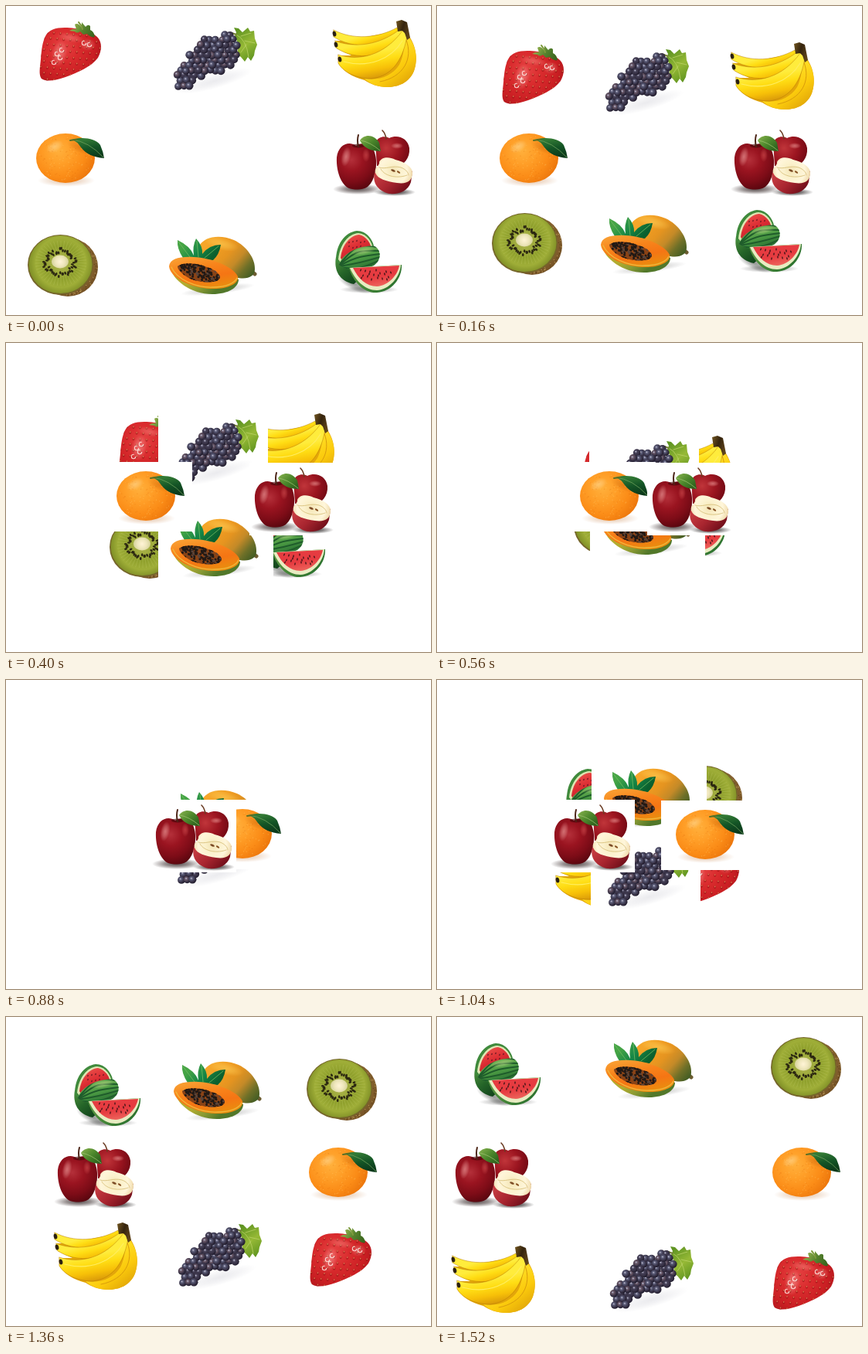
Write an HTML page with a canvas that moves like this. It is 550x400 px and loops after 1600 ms.

```html
<!DOCTYPE html>
<html lang="en">
<head>
<meta charset="utf-8">
<title>Fruit swap</title>
<style>
html, body { margin: 0; width: 100%; height: 100%; overflow: hidden; background: #fff; }
canvas { display: block; }
</style>
</head>
<body>
<canvas id="stage" width="550" height="400"></canvas>
<script>
const ctx = document.getElementById('stage').getContext('2d');
const STEP = 80, STEPS = 20;

// ---- drawing helpers ----
function addStops(g, colors) {
  colors.forEach((c, i) => g.addColorStop(i / (colors.length - 1), c));
  return g;
}
const linear = (x0, y0, x1, y1, ...colors) => addStops(ctx.createLinearGradient(x0, y0, x1, y1), colors);
const radial = (x, y, r, ...colors) => addStops(ctx.createRadialGradient(x, y, 0, x, y, r), colors);

function fill(d, style) {
  ctx.fillStyle = style;
  ctx.fill(new Path2D(d));
}
function line(d, style, width = 1) {
  ctx.strokeStyle = style;
  ctx.lineWidth = width;
  ctx.lineCap = 'round';
  ctx.stroke(new Path2D(d));
}
function oval(x, y, rx, ry, tilt, style) {
  ctx.fillStyle = style;
  ctx.beginPath();
  ctx.ellipse(x, y, rx, ry, tilt, 0, 7);
  ctx.fill();
}
function soft(x, y, rx, ry, rgb, alpha, tilt = 0) {
  ctx.save();
  ctx.translate(x, y);
  ctx.rotate(tilt);
  ctx.scale(rx, ry);
  oval(0, 0, 1, 1, 0, radial(0, 0, 1, `rgba(${rgb},${alpha})`, `rgba(${rgb},${alpha * 0.6})`, `rgba(${rgb},0)`));
  ctx.restore();
}
function inside(d, draw) {
  ctx.save();
  ctx.clip(new Path2D(d));
  draw();
  ctx.restore();
}
function randomizer(seed) {
  return () => (seed = seed * 16807 % 2147483647) / 2147483647;
}

// ---- fruits, drawn at their starting places ----
function strawberry() {
  const body = 'M51 39C55 31 64 28 76 28C93 28 111 33 118 40C125 47 124 58 119 67C110 79 93 86 77 92C65 96 53 99 46 94C42 89 44 80 45 69C46 57 47 47 51 39Z';
  fill(body, radial(74, 52, 60, '#e64444', '#da2c2e', '#ca1f23', '#a8141a'));
  inside(body, () => {
    for (let row = 0; row < 9; row++) {
      for (let col = 0; col < 10; col++) {
        const x = 45 + col * 8.5 + row % 2 * 4.2, y = 33 + row * 7.6 + col * 0.7;
        oval(x, y + 0.8, 1.5, 1.8, 0.3, 'rgba(140,10,16,.5)');
        oval(x, y, 0.8, 1, 0.3, 'rgba(235,150,95,.75)');
      }
    }
    soft(69, 62, 10, 17, '255,195,190', 0.4, 0.2);
    soft(84, 41, 18, 6, '255,165,155', 0.35, 0.2);
    soft(106, 50, 10, 8, '255,190,180', 0.35);
    ctx.strokeStyle = 'rgba(255,235,230,.85)';
    ctx.lineWidth = 1.1;
    for (const [x, y] of [[66, 62], [72, 57], [70, 67], [101, 48], [108, 50], [62, 73]]) {
      ctx.beginPath();
      ctx.arc(x, y, 2.7, 0, 5);
      ctx.stroke();
    }
  });
  fill('M82 32Q87 29 91 30L89 24Q93 21 98 28L98 21L103 27Q106 23 109 26L109 31Q114 33 115 40Q109 41 105 36L100 37L96 33Q92 36 89 33Z',
    linear(88, 24, 112, 38, '#8fae4a', '#55822e', '#3c671f'));
  line('M94 21Q98 25 99 30', '#7d9a3c', 2);
}

const grapeSpots = (() => {
  const rand = randomizer(77), spots = [];
  const cluster = new Path2D('M248 50L253 44L266 39L284 36L294 38L300 52L300 71L288 82L268 88L248 92L240 103L226 107L217 100L218 88L220 78L233 73L234 63L246 60Z');
  for (let row = 0; row < 11; row++) {
    for (let col = 0; col < 12; col++) {
      const x = 222 + col * 7.6 + row % 2 * 3.8 + rand() * 2 - 1, y = 37 + row * 6.6 + rand() * 2 - 1;
      if (ctx.isPointInPath(cluster, x, y)) spots.push([x, y, 4.5 + rand() * 0.9, rand()]);
    }
  }
  return spots.sort((a, b) => a[3] - b[3]);
})();

function grapes() {
  soft(270, 97, 50, 10, '130,130,150', 0.16, -0.28);
  fill('M296 39L298 34L295 28L301 29L306 34L313 28L316 33L321 32L322 42L325 50L322 58L321 64L317 71L313 66L309 72L304 66L299 63L301 50Z',
    linear(298, 32, 322, 68, '#5f9422', '#96b936', '#5f9420'));
  line('M298 37Q311 43 314 66M304 39L317 35M309 45L322 48M311 50L304 60', '#bcd268', 0.8);
  line('M285 37L290 34L298 37', '#758036', 2);
  for (const [x, y, r, tone] of grapeSpots) {
    const hue = (tone * 37) % 1;
    const mid = hue < 0.3 ? '#62505f' : hue < 0.7 ? '#50516c' : '#413c52';
    oval(x, y, r, r, 0, radial(x - 1.2, y - 1.3, r * 1.3, '#918fa6', mid, '#383246', '#1d192a'));
    oval(x - 1.4, y - 1.6, 0.8, 0.7, 0, 'rgba(215,215,235,.75)');
  }
}

function banana() {
  const yellow = (y0, y1) => linear(470, y0, 476, y1, '#ffec3c', '#ffdd14', '#f7c008', '#d8980a');
  fill('M508 32L520 37C530 49 534 68 528 84C522 99 508 105 493 105C482 105 471 101 464 96C448 92 436 84 430 74L431 64L447 64L428 55L426 45L440 45Z', '#e3a60a');
  fill('M519 38C530 49 534 68 528 84C522 99 508 105 493 105C482 105 471 101 464 94C484 97 500 90 509 76C515 64 516 49 515 40Z',
    linear(493, 60, 525, 101, '#ffe028', '#fbca0c', '#dda008'));
  line('M518 44C527 68 515 92 484 98', '#d99c0c', 1);
  const fingers = [
    ['M424 31C448 44 481 42 506 28L511 35C487 55 449 56 424 40Z', 35, 54, 425, 36],
    ['M426 45C450 55 485 51 511 29L515 36C495 68 452 72 427 54Z', 46, 70, 427, 50],
    ['M430 63C457 72 490 64 513 32L519 38C515 65 502 91 473 94C451 94 435 84 430 74Z', 60, 94, 432, 69]
  ];
  for (const [d, y0, y1, tipX, tipY] of fingers) {
    fill(d, yellow(y0, y1));
    line(d, 'rgba(180,118,4,.6)', 0.8);
    oval(tipX, tipY, 2.3, 3.6, -0.2, '#2b2011');
  }
  line('M437 72C470 81 499 68 513 45', '#ffee60', 1.2);
  fill('M505 20L512 18L519 21L523 41L519 44L516 35L513 32L507 33Z', linear(504, 25, 523, 31, '#6d521f', '#35240e', '#5e431a'));
}

function orange() {
  soft(78, 226, 37, 8, '205,145,95', 0.5);
  oval(77, 197, 38, 32, 0, radial(68, 187, 52, '#ffb03c', '#ff9f28', '#fb8c17', '#ea730a'));
  const rand = randomizer(31);
  for (let i = 0; i < 130; i++) {
    const a = rand() * 6.3, r = Math.sqrt(rand()) * 0.93;
    oval(77 + 38 * r * Math.cos(a), 197 + 32 * r * Math.sin(a), 0.7, 0.6, 0, i % 2 ? 'rgba(255,205,110,.4)' : 'rgba(215,95,0,.25)');
  }
  soft(63, 182, 12, 7, '255,225,165', 0.5, -0.5);
  soft(95, 183, 17, 7, '180,80,0', 0.3, 0.4);
  fill('M85 173C98 169 116 171 122 180Q126 189 127 197C113 196 103 191 97 183Q92 175 85 173Z',
    linear(105, 172, 110, 196, '#347b35', '#145526', '#0c3a1b'));
  line('M85 173Q107 175 126 196', '#6fa05c', 0.8);
  line('M83 174L91 173', '#5c6f25', 2);
}

function apples() {
  soft(455, 237, 32, 7, '30,15,15', 0.75);
  soft(503, 241, 27, 5, '20,15,15', 0.85);
  fill('M478 177C482 168 491 168 496 171C507 166 520 171 522 184C523 197 515 206 504 209L480 207Z',
    radial(492, 184, 34, '#c0353a', '#9c1520', '#6a0712'));
  line('M492 172Q491 165 487 161', '#6a3b22', 1.6);
  fill('M453 181C443 174 430 180 428 196C427 215 435 236 448 237C455 238 462 238 468 234C478 226 481 205 478 193C475 178 463 175 453 181Z',
    radial(447, 199, 43, '#b4303a', '#9a1420', '#7d0c17', '#51050d'));
  soft(440, 195, 6, 13, '255,190,185', 0.5, 0.2);
  soft(466, 193, 5, 9, '225,90,90', 0.5);
  soft(506, 181, 8, 4, '255,185,180', 0.5);
  oval(456, 181, 8, 2.5, 0, 'rgba(65,4,8,.6)');
  line('M456 182Q454 174 456 167', '#4c2517', 2);
  fill('M458 174C463 166 476 165 483 177L485 188C472 188 463 184 458 174Z', linear(462, 169, 479, 188, '#7caa47', '#4b862b', '#2e621e'));
  line('M459 174Q471 176 484 187', '#a5c878', 0.7);
  fill('M477 216C474 228 480 239 496 243C508 244 520 240 524 228L526 214L500 205Z', linear(483, 217, 510, 244, '#c43a40', '#a8252f', '#74101b'));
  fill('M478 216C476 209 484 207 483 202C486 195 496 195 504 199C516 202 526 208 526 216C526 226 519 231 506 229C492 227 481 224 478 216Z',
    radial(501, 213, 27, '#f3e4b4', '#fbf1cc', '#fff6db', '#ecd4a0'));
  line('M483 209C491 212 500 206 511 209C519 212 521 217 521 219M485 211C491 222 509 223 519 219', '#d8c17d', 0.9);
  oval(501, 213, 3, 1.4, 0.4, '#7a4a24');
  oval(508, 215, 2.4, 1.2, 0.5, '#8a5526');
}

function kiwi() {
  oval(80, 338, 39, 38, 0, radial(79, 332, 47, '#a98848', '#946f38', '#6f4d22'));
  const rand = randomizer(12);
  for (let i = 0; i < 90; i++) {
    const a = rand() * 4 - 1.2, r = 0.88 + rand() * 0.12;
    oval(80 + 38 * r * Math.cos(a), 338 + 37 * r * Math.sin(a), 0.6, 0.6, 0, i % 2 ? '#bf9f5c' : '#5c3e1a');
  }
  oval(70.5, 335, 42.5, 39, 0, '#75652a');
  oval(70.5, 334.5, 41, 37.5, 0, radial(71, 332, 43, '#c9cc72', '#9da83a', '#8fa02c', '#9fae38', '#7c8c24'));
  for (let i = 0; i < 44; i++) {
    const a = i * Math.PI / 22, c = Math.cos(a), s = Math.sin(a);
    line(`M${71 + 12 * c} ${332 + 10 * s}L${71 + 33 * c} ${333 + 29 * s}`, 'rgba(205,212,120,.25)', 0.9);
  }
  for (let i = 0; i < 54; i++) {
    const a = i * Math.PI / 27 + rand() * 0.1, r = 0.82 + rand() * 0.4;
    oval(70 + 18 * r * Math.cos(a), 332 + 15 * r * Math.sin(a), 2, 1.3, a, '#2c2811');
  }
  oval(70, 331, 11, 8.5, 0, radial(70, 331, 12, '#fff4d6', '#eee6bc', '#cfce92'));
}

function papaya() {
  soft(274, 367, 48, 6, '105,105,105', 0.35, -0.12);
  line('M318 344L322 347', '#6b5c30', 5);
  fill('M249 312C257 297 278 296 295 303C312 311 323 328 322 341C322 350 313 354 301 352C282 353 259 338 249 312Z',
    linear(268, 300, 322, 347, '#f5a62a', '#f09c22', '#e59420', '#c48a28', '#6f7028', '#3d5a23'));
  soft(279, 308, 23, 8, '255,211,92', 0.55, 0.25);
  fill('M229 326Q221 314 222 303Q239 311 243 323Q241 311 246 301Q255 311 254 321Q263 309 278 309Q276 322 268 329Z',
    linear(236, 304, 264, 328, '#45a445', '#178747', '#0b602f'));
  line('M223 305L238 325M247 304L249 325M275 311L257 326', '#74bb62', 0.8);
  fill('M212 338C216 355 239 373 267 373C288 373 301 364 301 354L289 347Z', linear(245, 350, 266, 374, '#b4ac2f', '#8a9a33', '#52782a'));
  fill('M211 337C212 327 225 324 243 325C265 326 294 337 300 350C302 360 285 367 265 366C239 365 212 351 211 337Z',
    linear(246, 324, 254, 367, '#f99c30', '#f8841b', '#f57514', '#ea8c0f'));
  line('M214 338C221 354 246 365 268 364C284 364 296 359 299 352', '#f0b83c', 1.3);
  const hollow = 'M222 337C230 331 248 333 260 338C270 341 280 348 276 354C268 360 245 358 233 350C227 346 222 341 222 337Z';
  fill(hollow, '#8a4316');
  inside(hollow, () => {
    const rand = randomizer(54);
    for (let i = 0; i < 190; i++) {
      const x = 223 + rand() * 55, y = 333 + rand() * 25;
      oval(x, y, 1.7, 1.4, rand(), i % 6 ? '#211915' : '#5a443a');
    }
  });
}

function watermelon() {
  soft(451, 360, 24, 8, '60,65,60', 0.55, 0.45);
  soft(470, 367, 38, 5, '60,60,60', 0.5);
  fill('M427 325C424 342 431 356 450 360L462 350L450 330Z', linear(428, 325, 455, 358, '#4c8f3c', '#246428', '#10401a'));
  fill('M427 330C427 309 438 293 454 291C467 291 476 303 477 316L452 328L435 338Z', '#3f8a3c');
  fill('M430 328C432 308 443 295 456 294C467 295 474 305 475 316L434 333Z', '#dfe6b4');
  fill('M433 326C435 308 446 297 457 296C466 298 473 307 473 317L436 331Z', linear(444, 297, 458, 328, '#ec4f4a', '#dc2d33', '#b81b2c'));
  for (let i = 0; i < 9; i++) oval(444 + i % 5 * 5, 306 + Math.floor(i / 5) * 7 - i % 3, 0.7, 1.2, 0.4, '#601622');
  const whole = 'M431 335C435 320 458 309 477 311C486 316 486 329 476 336C460 343 442 344 431 335Z';
  fill(whole, linear(452, 311, 461, 343, '#74b055', '#4b9a43', '#23692f'));
  inside(whole, () => {
    for (let i = 0; i < 5; i++) {
      const y = 311 + i * 7;
      line(`M432 ${334 + i}Q449 ${y + 2} 458 ${y}T484 ${313 + i * 4}`, '#1f5c2b', 2);
    }
    soft(463, 317, 16, 5, '205,232,150', 0.5, -0.2);
  });
  fill('M444 339L512 335C513 352 499 370 480 371C463 372 449 357 444 339Z', linear(450, 345, 491, 372, '#579540', '#2f7530'));
  fill('M445 339L511 335C510 351 496 367 480 368C464 368 452 355 445 339Z', '#e8ecc2');
  fill('M449 339L509 336C507 348 495 362 480 363C466 363 456 353 449 339Z', linear(476, 337, 481, 365, '#e63c41', '#e63b40', '#ee6a60'));
  for (let i = 0; i < 19; i++) {
    const x = 459 + i * 11 % 41, y = 342 + i * 5 % 13;
    oval(x, y, 0.8, 1.7, (480 - x) / 45, '#4b171a');
  }
}

// Back to front: draw, box [x, y, w, h], total travel [dx, dy].
const cards = [
  [strawberry, [25, 18, 111, 86], [391, 282]],
  [banana, [415, 16, 119, 93], [-404, 277.5]],
  [kiwi, [25, 292, 100, 88], [404, -270]],
  [watermelon, [400, 279, 128, 104], [-378, -257]],
  [grapes, [194.5, 20, 142, 98], [6.5, 268.5]],
  [papaya, [194.5, 292, 149, 91], [7, -269]],
  [orange, [20, 153, 117, 90], [395, 4]],
  [apples, [421, 154, 111, 94], [-404, 2]]
];

let shown = -1;
function tick(now) {
  const step = Math.floor(now / STEP) % STEPS;
  if (step !== shown) {
    shown = step;
    ctx.fillStyle = '#fff';
    ctx.fillRect(0, 0, 550, 400);
    for (const [draw, [x, y, w, h], [dx, dy]] of cards) {
      const k = step / (STEPS - 1);
      ctx.save();
      ctx.translate(Math.round(dx * k), Math.round(dy * k));
      ctx.fillStyle = '#fff';
      ctx.fillRect(Math.round(x), y, w, h);
      draw();
      ctx.restore();
    }
  }
  requestAnimationFrame(tick);
}
tick(0);
</script>
</body>
</html>
```
